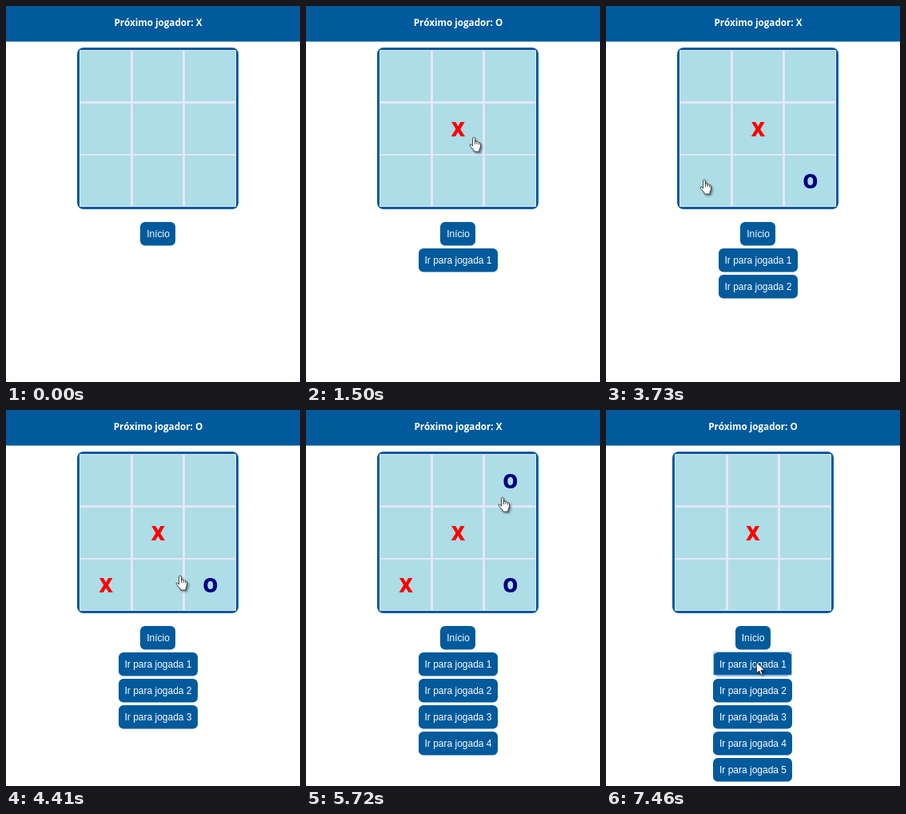
These frames come from a looping animation (368x470 px, 8 s). An HTML page with a canvas:

```html
<!DOCTYPE html>
<html lang="pt">
<head>
<meta charset="utf-8">
<title>Jogo da velha</title>
<style>
  html, body { margin: 0; width: 100%; height: 100%; overflow: hidden; background: #fff; }
  canvas { display: block; }
</style>
</head>
<body>
<canvas id="stage" width="368" height="470"></canvas>
<script>
const ctx = document.getElementById('stage').getContext('2d');
const LOOP = 8000;
const BLUE = '#005a9c', CELL = '#addde6', GRID = '#e6e6fa';
const TOP = 55.2, SIZE = 196, PITCH = SIZE / 3;

// The pointer glides to each stop along an arc, rests there and clicks
const home = { x: -10, y: 190 };
const stops = [
  { leave: 690, arrive: 1270, click: 1500, x: 210, y: 164, bend: 0 },
  { leave: 2200, arrive: 2680, click: 2680, x: 254, y: 214, bend: 0 },
  { leave: 3180, arrive: 3730, click: 3790, x: 123, y: 217, bend: 0 },
  { leave: 3950, arrive: 5000, click: 5320, x: 260, y: 90, bend: 60 },
  { leave: 5600, arrive: 6060, click: 6080, x: 166, y: 99, bend: -34 },
  { leave: 6280, arrive: 6940, click: 7460, x: 188, y: 315, bend: -14 }
];
const moves = stops.slice(0, -1);
const jump = stops[stops.length - 1];
const FOCUS_LEAD = 160;

const hand = new Path2D('M4.5 2Q6 0 7.5 2V6.5Q9 5.5 10 7Q11.5 6.2 12.5 7.8' +
  'Q14 7 14.5 9V13L13 16.5V19H6V17L1.3 12Q.5 10 2 9.8L4.5 12Z');
const knuckles = new Path2D('M7.5 6.5V10M10 7V10M12.5 8V10.5');
const arrow = new Path2D('M.5 .5V14L3.7 11L6 16L8 15L5.8 10.3H10.3Z');

const boardLeft = mid => Math.floor(mid - SIZE / 2);
const smooth = k => k * k * (3 - 2 * k);

function box(x, y, w, h, r, color) {
  ctx.fillStyle = color;
  ctx.beginPath();
  ctx.roundRect(x, y, w, h, r);
  ctx.fill();
}

function label(text, x, y, font, color) {
  ctx.font = font;
  ctx.fillStyle = color;
  ctx.fillText(text, x, y);
}

// Pixel-aligned start and length of cell i along one axis
function span(origin, i) {
  const a = Math.round(origin + i * PITCH + 1.2);
  return [a, Math.round(origin + (i + 1) * PITCH - 1.2) - a];
}

function drawBoard(mid, count) {
  const left = boardLeft(mid);
  box(left - 3, 52, SIZE + 6, SIZE + 6, 8, BLUE);
  box(left, 55, SIZE, SIZE, 1, GRID);
  for (let i = 0; i < 9; i++) {
    const [x, w] = span(left, i % 3), [y, h] = span(TOP, Math.floor(i / 3));
    box(x, y, w, h, 0, CELL);
  }
  moves.slice(0, count).forEach((m, i) => {
    const col = Math.floor((m.x - boardLeft(190.5)) / PITCH);
    const row = Math.floor((m.y - TOP) / PITCH);
    label(i % 2 ? 'O' : 'X', mid + (col - 1) * PITCH, 98 + row * 65,
      '800 24px "Open Sans", sans-serif', i % 2 ? '#000080' : '#f00');
  });
}

function drawButton(text, mid, y) {
  ctx.font = '12px "Liberation Sans", Arial, sans-serif';
  const w = Math.round(ctx.measureText(text).width + 15);
  box(Math.floor(mid - w / 2), y, w, 29.5, 6, BLUE);
  label(text, mid, y + 19, ctx.font, '#fff');
}

function pointerAt(t) {
  const i = stops.findLastIndex(s => s.leave <= t);
  const to = stops[i], from = stops[i - 1] || home;
  const k = smooth(Math.min(1, (t - to.leave) / (to.arrive - to.leave)));
  const dx = to.x - from.x, dy = to.y - from.y;
  const arc = to.bend * Math.sin(Math.PI * k) / Math.hypot(dx, dy);
  return [from.x + dx * k - dy * arc, from.y + dy * k + dx * arc];
}

function drawShape(shape) {
  ctx.save();
  ctx.shadowColor = 'rgba(0,0,0,.5)';
  ctx.shadowBlur = 3;
  ctx.shadowOffsetX = ctx.shadowOffsetY = 2;
  ctx.fillStyle = '#fff';
  ctx.fill(shape);
  ctx.restore();
  ctx.stroke(shape);
}

function drawPointer(t, mid) {
  if (t < stops[0].leave) return;
  const [x, y] = pointerAt(t).map(Math.round);
  const onBoard = Math.abs(x - mid) < SIZE / 2 && y > TOP && y < TOP + SIZE;
  ctx.save();
  ctx.strokeStyle = '#222';
  ctx.lineWidth = 0.8;
  if (onBoard) {
    ctx.translate(x - 6, y - 1);
    drawShape(hand);
    ctx.stroke(knuckles);
  } else {
    ctx.translate(x, y);
    drawShape(arrow);
  }
  ctx.restore();
}

function draw(t) {
  const played = moves.filter(m => m.click <= t).length;
  const shown = t >= jump.click ? 1 : played;
  // The scrollbar of the longer page moves the centre left
  const mid = played === moves.length ? 184 : 190.5;

  ctx.fillStyle = '#fff';
  ctx.fillRect(0, 0, 368, 470);
  ctx.textAlign = 'center';
  box(0, 0, 368, 44.5, 0, BLUE);
  label('Próximo jogador: ' + (shown % 2 ? 'O' : 'X'), mid, 25,
    '700 11.7px "Open Sans", sans-serif', '#fff');
  drawBoard(mid, shown);

  for (let i = 0; i <= played; i++) {
    drawButton(i ? 'Ir para jogada ' + i : 'Início', mid, 270 + i * 33);
  }
  if (t >= jump.click - FOCUS_LEAD) {
    ctx.strokeStyle = '#a3c6f0';
    ctx.lineWidth = 1;
    ctx.strokeRect(134.5, 302.5, 98, 29);
  }
  drawPointer(t, mid);
}

const start = performance.now();
function tick() {
  draw((performance.now() - start) % LOOP);
  requestAnimationFrame(tick);
}
tick();
</script>
</body>
</html>
```
